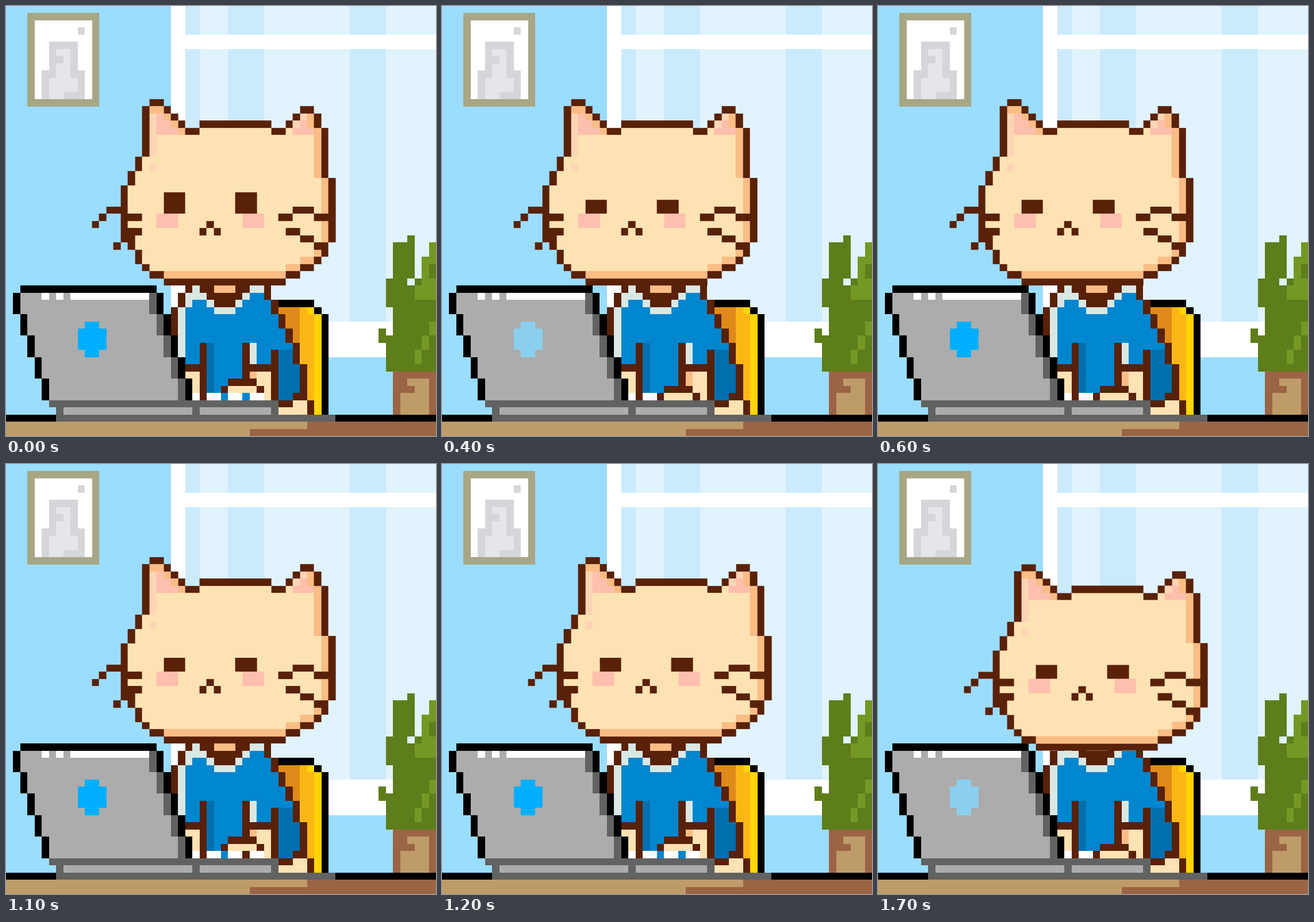
Recreate the animation shown at these times as an HTML page. Size 748 by 748 pixels, loop 1.8 s.

```html
<!DOCTYPE html>
<html lang="en">
<head>
<meta charset="utf-8">
<title>Cat at a laptop</title>
<style>
  html, body { margin: 0; width: 100%; height: 100%; overflow: hidden; background: #9bddff; }
  svg { display: block; width: 100vw; height: 100vh; shape-rendering: crispEdges; }

  .line { fill: #592108; }
  .fur { fill: #fde2b4; }
  .shade { fill: #fabd85; }
  .soft { fill: #fcd5b5; }
  .pink { fill: #fdbfae; }
  .blue { fill: #0086cf; }
  .navy { fill: #006fae; }
  .trim { fill: #dae8e4; }
  .white { fill: #fff; }
  .wood { fill: #be9c6a; }
  .bark { fill: #9a6445; }
  .steel { fill: #acacac; }
  .iron { fill: #616262; }

  .head, .lids, .mark, .up, .down, .key, .gap { animation: 1800ms step-end infinite; }
  .head { animation-name: head; }
  .lids { animation-name: lids; }
  .mark { animation-name: mark; }
  .up { animation-name: up; }
  .down { animation-name: down; }
  .key { animation-name: key; }

  @keyframes head {
    0% { transform: translate(0, 0); }
    22.2222% { transform: translate(-2px, 0); }
    61.1111% { transform: translate(0, 0); }
    94.4444%, 100% { transform: translate(0, 1px); }
  }
  @keyframes lids {
    0% { visibility: visible; }
    22.2222%, 100% { visibility: hidden; }
  }
  @keyframes mark {
    0% { fill: #00aeff; }
    11.1111% { fill: #8ad0ee; }
    33.3333% { fill: #00aeff; }
    44.4444% { fill: #8ad0ee; }
    61.1111% { fill: #00aeff; }
    72.2222%, 100% { fill: #8ad0ee; }
  }
  @keyframes up {
    0% { visibility: visible; }
    11.1111% { visibility: hidden; }
    61.1111% { visibility: visible; }
    72.2222%, 100% { visibility: hidden; }
  }
  @keyframes down {
    0% { visibility: hidden; }
    11.1111% { visibility: visible; }
    61.1111% { visibility: hidden; }
    72.2222%, 100% { visibility: visible; }
  }
  @keyframes key {
    0% { fill: #0086cf; }
    61.1111% { fill: #592108; }
    66.6667%, 100% { fill: #0086cf; }
  }
</style>
</head>
<body>
<svg viewBox="0 0 60 60" preserveAspectRatio="none">
  <!-- room -->
  <path fill="#9bddff" d="M0 0h60v60H0z"/>
  <path class="white" d="M23 0h37v49H23z"/>
  <path fill="#e1f3fd" d="M25 0h35v4H25zM25 6h35v38H25z"/>
  <path fill="#cbeafc" d="M25 0h2v4h-2zM31 0h5v4h-5zM48 0h5v4h-5zM25 6h2v38h-2zM31 6h5v38h-5zM48 6h5v38h-5z"/>

  <!-- picture -->
  <path fill="#a8a684" d="M3 1h10v13H3z"/>
  <path class="white" d="M4 2h8v11H4z"/>
  <path fill="#d4d6d9" d="M10 3h1v1h-1zM6 5h4v4h1v4H5V9h1z"/>
  <path fill="#e4e6e9" d="M7 6h2v4h1v2H8v1H6v-3h1V8h1V7H7z"/>

  <!-- plant -->
  <path fill="#5e7d1b" d="M56 32h1v6h-1v1h1v-1h1v-3h1v-2h1v18h-7v-4h-1v-2h1v1h1v-4h-1v-4h1v-5h2z"/>
  <path fill="#759724" d="M59 33h1v3h-1v3h-1v-4h1zM57 39h2v2h-2zM59 38h1v3h-1zM59 44h1v2h-1v2h-1v-2h1zM57 48h1v2h-1z"/>
  <path class="bark" d="M54 51h6v6h-6z"/>
  <path class="wood" d="M56 52h3v5h-4v-3h2v-1h-1z"/>

  <!-- chair -->
  <path d="M38 41h5v1h1v1h1v14h-7z"/>
  <path fill="#df8a1a" d="M38 42h3v8h-3z"/>
  <path fill="#fcb715" d="M41 42h1v1h1v14h-2z"/>
  <path fill="#ffd504" d="M42 42h1v1h1v14h-1V43h-1z"/>

  <!-- desk -->
  <path d="M0 57h60v1H0z"/>
  <path class="wood" d="M0 58h60v2H0z"/>
  <path class="bark" d="M42 58h18v2H34v-1h8z"/>

  <!-- body -->
  <path class="line" d="M25 39h12v2h1v2h1v2h1v2h1v3h1v5H23V42h1v-2h1z"/>
  <path class="blue" d="M25 41h3v1h5v-1h1v-1h2v1h1v2h1v2h1v2h1v3h1v4H25z"/>
  <path class="trim" d="M26 39h1v1h1v1h1v1h3v-1h1v-1h1v-1h2v1h-2v1h-1v1h-1v1h-3v-1h-1v-1h-2v1h-1v8h-1v-8h1v-2h1z"/>
  <path class="shade" d="M29 39h3v1h-3z"/>
  <path class="navy" d="M28 47h1v7h-1zM38 48h2v2h1v4h-1v1h-2z"/>
  <path class="trim" d="M34 47h1v3h-1z"/>
  <path class="line" d="M27 47h1v8h-1zM25 50h2v1h-2zM33 47h1v3h3v-2h1v7h-1v-4h-3v2h-1z"/>
  <path class="fur" d="M25 51h2v3h-2zM35 51h2v4h-2z"/>
  <path class="shade" d="M34 51h1v2h-1z"/>
  <path class="white" d="M26 54h1v1h-1zM28 54h2v1h-2z"/>
  <path class="line" d="M38 55h2v-1h2v1h1v2h-5z"/>
  <path class="fur" d="M40 55h2v2h-4v-1h2z"/>

  <!-- typing paw -->
  <g class="down">
    <path class="line" d="M31 53h4v1h1v1h-6v-1h1z"/>
    <path class="fur" d="M31 54h4v1h-4z"/>
  </g>
  <g class="up">
    <path class="line" d="M31 52h4v1h1v1h-6v-1h1z"/>
    <path class="fur" d="M31 53h4v1h-4z"/>
    <path class="white" d="M31 54h5v1h-5z"/>
    <path class="blue" d="M30 54h1v1h-1z"/>
    <path class="key" d="M33 54h1v1h-1z"/>
  </g>

  <!-- laptop -->
  <path d="M2 39h19v1h1v3h1v3h1v3h1v3h1v3H5v-3H4v-3H3v-3H2v-3H1v-3h1z"/>
  <path class="iron" d="M2 40h19v3h1v3h1v3h1v3h1v3H6v-3H5v-3H4v-3H3v-3H2z"/>
  <path class="steel" d="M2 40h18v3h1v3h1v3h1v3h1v3H6v-3H5v-3H4v-3H3v-3H2z"/>
  <path class="white" d="M5 40h1v1H5zM7 40h1v1H7zM9 40h11v1H9z"/>
  <path class="mark" d="M11 44h2v1h1v3h-1v1h-2v-1h-1v-3h1z"/>
  <path class="iron" d="M6 55h32v2h8v1H7v-2H6z"/>
  <path class="steel" d="M8 56h18v1H8zM27 56h10v1H27z"/>

  <!-- head -->
  <g class="head">
    <path class="line" d="M20 13h2v1h1v1h1v1h1v1h2v-1h10v1h2v-1h1v-1h1v-1h2v1h1v2h1v7h1v9h-1v2h-1v1h-1v1h-2v1h-2v1H22v-1h-2v-1h-1v-1h-1v-2h-1v-1h-1v-8h1v-2h1v-2h1v-7h1z"/>
    <path class="fur" d="M20 14h2v1h1v1h1v1h1v1h2v-1h10v1h2v-1h1v-1h1v-1h2v2h1v7h1v9h-1v2h-1v1h-2v1h-2v1H22v-1h-2v-1h-1v-2h-1v-2h-1v-7h1v-2h1v-2h1z"/>
    <path class="shade" d="M20 14h2v1h1v1h1v1h1v1h-1v-1h-1v-1h-1v-1h-2zM42 15h1v2h1v7h1v9h-1v-9h-1v-7h-1zM43 34h1v1h-1v1h-2v1h-2v1H22v-1h17v-1h2v-1h2z"/>
    <path class="soft" d="M20 15h1v6h-1zM20 22h1v1h-1zM41 15h1v1h-1v1h-1v-1h1z"/>
    <path class="pink" d="M21 15h1v1h1v1h1v1h-3zM41 16h1v1h1v1h-3v-1h1zM21 29h3v2h-3zM33 29h3v2h-3z"/>
    <!-- whiskers -->
    <path class="line" d="M14 28h3v1h2v1h-3v-1h-2v1h-1v1h-1v-1h1v-1h1zM17 31h2v1h-2zM15 33h1v1h-1z"/>
    <path class="line" d="M40 28h3v1h2v1h-2v-1h-3v1h-2v-1h2zM39 31h2v1h2v1h2v1h-2v-1h-2v-1h-2z"/>
    <!-- face -->
    <path class="line" d="M28 30h1v1h-1zM27 31h1v1h-1zM29 31h1v1h-1zM22 27h3v2h-3zM32 27h3v2h-3z"/>
    <path class="line lids" d="M22 26h3v1h-3zM32 26h3v1h-3z"/>
  </g>
</svg>
</body>
</html>
```
